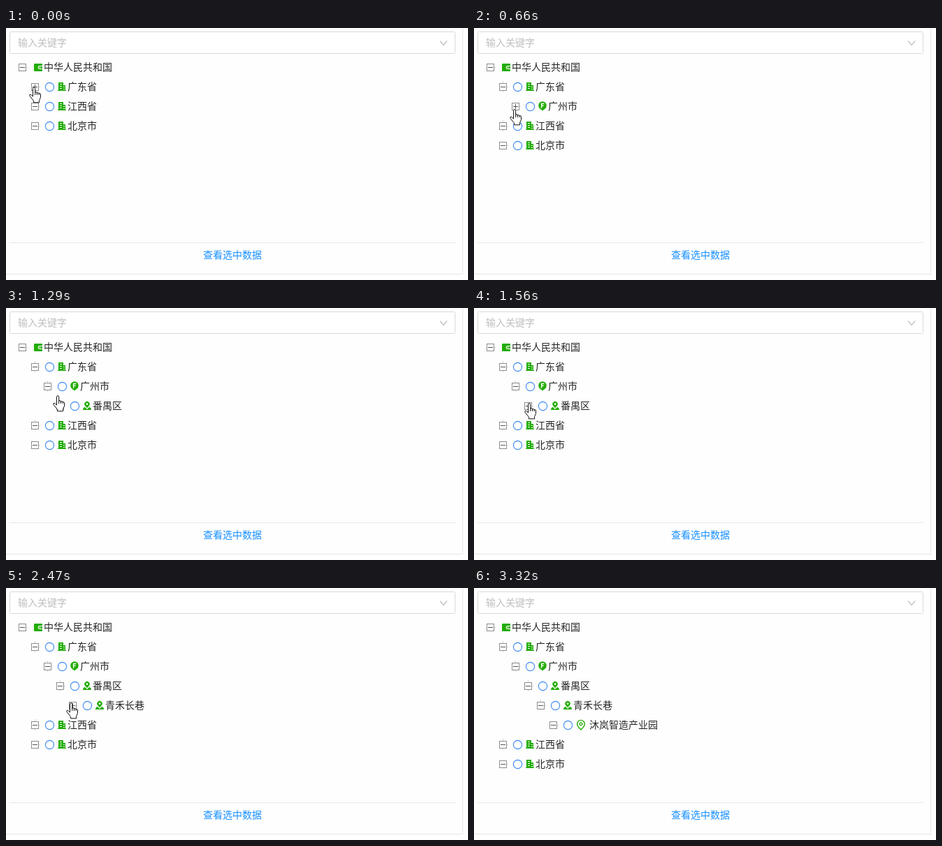
Write an HTML page that moves like this. It is 661 by 361 pixels and loops after 4690 ms.

```html
<!DOCTYPE html>
<html lang="zh-CN">
<head>
<meta charset="utf-8">
<title>地区树</title>
<style>
  html, body { margin: 0; width: 100%; height: 100%; overflow: hidden; background: #fefefe; }
  #stage { display: block; }
  text { font: 14px "Noto Sans CJK SC", "Noto Sans CJK", sans-serif; fill: #262626; }
  .line { fill: none; stroke: #e8e8e8; }
  .tick { fill: none; stroke: #d4d4d4; }
  .box { fill: #fff; stroke: #8c8c8c; }
  .sign { fill: none; stroke: #555; }
  .radio { fill: #fff; stroke: #3b8af2; stroke-width: 1.1; }
  .icon { fill: #22ac04; }
  .cut { fill: #fff; }
  .cursor { fill: #fff; stroke: #111; stroke-linejoin: round; }
</style>
</head>
<body>
<svg id="stage" width="661" height="361" viewBox="0 0 661 361">
  <path class="line" d="M0 352.5H653.5V0M5 307.5H643"/>
  <rect x="5.5" y="5.5" width="637" height="31" rx="2" fill="#fff" stroke="#d9d9d9"/>
  <text x="17" y="26" style="fill:#bfbfbf">输入关键字</text>
  <path d="M621 18.5l5 6 5-6" fill="none" stroke="#bfbfbf" stroke-width="1.2"/>
  <text x="324" y="330" text-anchor="middle" style="fill:#1890ff">查看选中数据</text>
  <g id="tree"></g>
  <g id="hand" class="cursor">
    <path d="M5.5 14V2.3a1.6 1.6 0 0 1 3.2 0V8q2.6-1 2.7.9q2.6-.9 2.7.9q2.4-.6 2.4 1.3V15.5L14.6 19.5V22.8H6.5V20.3L1 13.4Q.2 11 2.4 11.2Z"/>
    <path d="M8.7 7.5V12M11.4 8.5V12M14.1 9.5V12" fill="none"/>
  </g>
  <path id="arrow" class="cursor" d="M.5 .5V16.3L4.2 13L6.8 19L9.2 18L6.7 12.2H11.6Z"/>
</svg>
<script>
const LOOP = 4690, ROW = 28, TOP = 70;
const $ = id => document.getElementById(id);

// Icons are drawn around their own centre.
const icons = {
  wallet: `<rect class="icon" x="-6" y="-5" width="12" height="11" rx="1"/>
    <path class="cut" d="M6-2H2.2a2 2 0 0 0 0 5H6Z"/>
    <path class="icon" d="M6-1H2.4a1.3 1.3 0 0 0 0 3H6Z"/><circle class="cut" cx="2.8" cy=".5" r=".8"/>`,
  building: `<path class="icon" d="M-5-6H2V-2H5V5H6V6H-6V5H-5Z"/>
    <path class="cut" d="M-3-4H0V-3H-3ZM-3-1H0V0H-3ZM-3 2H0V3H-3ZM2 0H4V1H2ZM2 3H4V4H2Z"/>`,
  flag: `<path class="icon" d="M0 6.5L-3.8 3.4A5.8 5.8 0 1 1 3.8 3.4Z"/>
    <path d="M-1.4 2.8V-3.5H2.4M-1.4-.6H1.8" fill="none" stroke="#fff" stroke-width="1.4"/>`,
  place: `<path class="icon" d="M0 3.2L-2.7 .2A3.7 3.7 0 1 1 2.7 .2ZM-3.3 1.8L0 5L3.3 1.8Q6 3 6.2 6H-6.2Q-6 3-3.3 1.8Z"/>
    <circle class="cut" cy="-2.4" r="1.4"/>`,
  pin: `<path d="M0 7Q-5.3 2-5.3-1.3A5.3 5.3 0 0 1 5.3-1.3Q5.3 2 0 7Z" fill="none" stroke="#22ac04" stroke-width="1.4"/>
    <circle cy="-1.2" r="1.9" fill="none" stroke="#22ac04" stroke-width="1.3"/>`
};

const chain = [
  ['广东省', 'building'], ['广州市', 'flag'], ['番禺区', 'place'],
  ['青禾长巷', 'place'], ['沐岚智造产业园', 'pin']
];
const siblings = [['江西省', 'building'], ['北京市', 'building']];

function addRow([label, icon], depth) {
  const x = 23.5 + depth * 18, pin = icon === 'pin';
  const iconX = depth ? x + (pin ? 39.5 : 38.5) : 46;
  const textX = depth ? x + (pin ? 51.5 : 46.5) : 54;
  $('tree').insertAdjacentHTML('beforeend', `<svg width="661" height="${ROW}">
    <path class="tick" d="M${x + 5.5} 14.5h2"/>
    <path class="tick stem" d="M${x} 6v3M${x} 20v2"/>
    <rect class="box" x="${x - 5}" y="9.5" width="10" height="10"/>
    <path class="sign" d="M${x - 3.5} 14.5h7"/>
    <path class="sign plus" d="M${x} 11v7"/>
    ${depth ? `<circle class="radio" cx="${x + 21}" cy="14.5" r="6.1"/>` : ''}
    <g transform="translate(${iconX} 14)">${icons[icon]}</g>
    <text x="${textX}" y="19">${label}</text></svg>`);
  const el = $('tree').lastElementChild;
  return { el, plus: el.querySelector('.plus'), stem: el.querySelector('.stem') };
}

const root = addRow(['中华人民共和国', 'wallet'], 0);
root.el.setAttribute('y', TOP - ROW);
root.plus.style.display = root.stem.style.display = 'none';
const branch = chain.map((item, i) => addRow(item, i + 1));
const rest = siblings.map(item => addRow(item, 1));
rest.forEach(row => row.plus.style.display = 'none');

// time, cursor (h = hand, a = arrow), x, y, pixels opened below the first row
const steps = [
  [0, 'h', 33, 84, 0], [120, 'h', 36, 86, 16], [270, 'h', 77, 114, 28],
  [390, 'h', 66, 119, 28], [540, 'h', 57, 119, 28], [660, 'h', 51, 116, 28],
  [780, 'h', 49, 113, 28], [930, 'h', 51, 111, 28], [1050, 'h', 52, 111, 29],
  [1170, 'h', 59, 117, 46], [1290, 'h', 67, 125, 56], [1440, 'h', 71, 132, 56],
  [1560, 'h', 72, 136, 56], [1840, 'h', 74, 143, 72], [1960, 'a', 81, 155, 84],
  [2230, 'a', 83, 158, 84], [2350, 'h', 86, 163, 84], [2470, 'h', 86, 164, 84],
  [2620, 'h', 100, 178, 100], [2740, 'h', 116, 197, 112],
  [3170, 'a', 202, 219, 112], [3320, '', 0, 0, 112]
];

const show = (el, on) => el.style.display = on ? '' : 'none';

function draw(t) {
  const [, kind, x, y, open] = steps.findLast(s => s[0] <= t);
  branch.forEach((row, i) => {
    const h = Math.max(0, Math.min(ROW, open - (i - 1) * ROW));
    row.el.setAttribute('y', TOP + i * ROW);
    row.el.setAttribute('height', i ? h : ROW);
    row.el.style.opacity = i ? h / ROW : 1;
    show(row.el, !i || h > 0);
    show(row.plus, i < chain.length - 1 && open <= i * ROW);
    show(row.stem, open > i * ROW);
  });
  rest.forEach((row, i) => {
    row.el.setAttribute('y', TOP + ROW * (i + 1) + open);
    show(row.stem, !i && open > 0);
  });
  for (const id of ['hand', 'arrow']) {
    show($(id), id[0] === kind);
    $(id).setAttribute('transform', `translate(${x} ${y})`);
  }
}

const start = performance.now();
function tick() {
  draw((performance.now() - start) % LOOP);
  requestAnimationFrame(tick);
}
tick();
</script>
</body>
</html>
```
